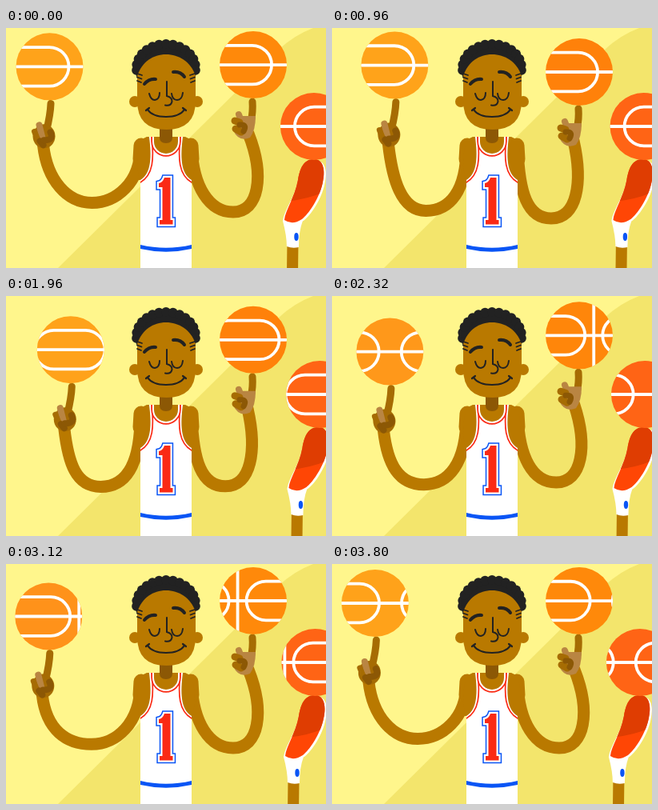
Write an HTML page with a canvas that moves like this. It is 400x300 px and loops after 3840 ms.

```html
<!DOCTYPE html>
<html>
<head>
<meta charset="utf-8">
<title>Spinning basketballs</title>
<style>
html, body { margin: 0; width: 100%; height: 100%; overflow: hidden; background: #fff68c; }
canvas { display: block; }
</style>
</head>
<body>
<canvas id="stage" width="400" height="300"></canvas>
<script>
const ctx = document.getElementById('stage').getContext('2d');
const LOOP = 3840, STEP = 40, R = 42, WRAP = 226;
const SKIN = '#b97900', FINGER = '#a66c03', DARK = '#8c5805', TAN = '#b98542', INK = '#222';
const RED = '#fa2a14', BLUE = '#0a55f5';
ctx.lineCap = 'round';

function fill(path, color) {
  ctx.fillStyle = color;
  ctx.fill(new Path2D(path));
}

function stroke(path, color, width) {
  ctx.strokeStyle = color;
  ctx.lineWidth = width;
  ctx.stroke(new Path2D(path));
}

function oval(x, y, rx, ry, color) {
  ctx.fillStyle = color;
  ctx.beginPath();
  ctx.ellipse(x, y, rx, ry, 0, 0, 7);
  ctx.fill();
}

function at(x, y, draw) {
  ctx.save();
  ctx.translate(x, y);
  draw();
  ctx.restore();
}

function mirrored(draw) {
  draw();
  at(400, 0, () => {
    ctx.scale(-1, 1);
    draw();
  });
}

// Cosine peaking at the given time, once per loop
const wave = (t, peak) => Math.cos((t - peak) / LOOP * 2 * Math.PI);
// The same wave with flattened ends
const eased = (t, peak, k) => Math.tanh(k * wave(t, peak)) / Math.tanh(k);

// The seams scroll sideways behind a round window; turn is in revolutions
function ball(x, y, turn, color) {
  at(x, y, () => {
    oval(0, 0, R, R, color);
    ctx.clip();
    stroke('M-42 0H42', '#fff', 3.8);
    const start = ((turn % 1) + 1) % 1 * WRAP;
    for (const left of [start - 2 * WRAP, start - WRAP, start]) {
      const middle = left + WRAP / 2;
      ctx.beginPath();
      ctx.roundRect(left + 14, -24.3, WRAP / 2 - 25, 48.6, 24.3);
      ctx.roundRect(middle + 11, -24.3, WRAP / 2 - 25, 48.6, 24.3);
      ctx.moveTo(middle, -R);
      ctx.lineTo(middle, R);
      ctx.stroke();
    }
  });
}

function background() {
  ctx.fillStyle = '#fff68c';
  ctx.fillRect(0, 0, 400, 300);
  fill('M65 300L341 27Q360 9 384 0H400V300Z', '#f3e56c');
}

function leftHand(x, y) {
  at(x, y, () => {
    oval(-7, 87, 14, 15, FINGER);
    stroke('M1.5 46Q1 60 -4 80', FINGER, 9);
    stroke('M-13 73L-9 89', TAN, 8);
    stroke('M-19 81L-14 93', FINGER, 7);
    stroke('M-12 93L-8 98', DARK, 8);
    stroke('M1 82Q6 92 -7 92', DARK, 8);
  });
}

function rightHand(x, y) {
  at(x, y, () => {
    stroke('M-1 46Q0 58 -3 72', FINGER, 9);
    fill('M-13 64H3Q3 82 -4 91Q-18 97 -25 82Z', TAN);
    stroke('M-18 62L-15 70', TAN, 8);
    stroke('M-23 70L-17 72', FINGER, 9);
    stroke('M-22 80L-15 84', FINGER, 9);
    stroke('M-17 75Q-7 74 -12 83', DARK, 7);
  });
}

function jersey() {
  fill('M176 136H224Q240 140 234 190H166Q160 140 176 136Z', SKIN);
  const shirt = 'M179 136C182 160 182 182 168 190V300H232V190C218 182 218 160 221 136Z';
  fill(shirt, '#fff');
  ctx.save();
  ctx.clip(new Path2D(shirt));
  mirrored(() => stroke('M182 134C185 162 185 185 166 194', RED, 1.7));
  const collar = 'M185 134V142A15 15 0 0 0 215 142V134';
  stroke(collar, RED, 7.4);
  stroke(collar, '#fff', 4);
  fill(collar, SKIN);
  stroke('M164 272.5Q200 282 236 272.5', BLUE, 4.8);
  ctx.restore();
  const digit = 'M198 187H205.5V240H208.5V245.5H192V240H195.5V199H191V194Q196 193 198 187Z';
  stroke(digit, BLUE, 7.4);
  stroke(digit, '#fff', 4.4);
  fill(digit, RED);
}

function head() {
  fill('M192 118H208V137Q208 144 200 144Q192 144 192 137Z', DARK);
  oval(200, 50, 39, 33, INK);
  for (let i = 0; i <= 14; i++) {
    const a = Math.PI * (0.97 + i * 1.06 / 14);
    oval(200 + 37 * Math.cos(a), 50 + 30 * Math.sin(a), 6, 6, INK);
  }
  mirrored(() => oval(161, 92, 7, 7, SKIN));
  fill('M164 60C170 42 184 33 200 33C216 33 231 42 237 60V91Q237 127 200.5 127Q164 127 164 91Z', SKIN);
  mirrored(() => stroke('M164 57L170 59M164 61.5L169.5 63.5M164 66L169 68', INK, 1.8));
  stroke('M173 70Q179 63 187 64M209 55Q218 54 223 61', INK, 4);
  stroke('M179 82Q181 90 186 90Q192 89 192 81M207 82Q208 90 214 90Q220 90 221 81', INK, 2);
  stroke('M201 67V85Q208 87 207.5 92Q206 98 199 96.5', INK, 2);
  stroke('M177 102Q183 111 200 111Q217 111 223 102M175 103L179 100M221 100L225 103', INK, 2.2);
}

function kicker(x, turn) {
  at(0.75 * (x - 385), 0, () => {
    stroke('M358.5 270L358 310', SKIN, 14);
    fill('M346 241C348 227 362 210 365 190L397 192C397 215 379 230 371 241Q366 254 366 274Q358 276 351 273Q351 260 346 241Z', '#fff');
    const sole = 'M385 164C398 164 399 180 396 193C392 213 378 233 370 239Q358 247 348 240C349 228 361 212 365 190C368 172 374 164 385 164Z';
    at(2.5, 1.5, () => fill(sole, '#fff'));
    fill(sole, '#ff4605');
    ctx.save();
    ctx.clip(new Path2D(sole));
    fill('M350 160H402V203Q380 214 350 217Z', '#df3d02');
    ctx.restore();
    oval(363, 261, 2.7, 5, BLUE);
  });
  ball(x, 123, turn, '#ff6415');
}

function arms(x, y, drop, y2) {
  const elbowX = 84.5 + 0.42 * x;
  const elbowY = 219 + 0.45 * (x - 55) + 0.43 * (y - 49);
  stroke(`M168 150C168 ${elbowY - 25} ${elbowX + 30} ${elbowY} ${elbowX} ${elbowY}
    C${elbowX - 31} ${elbowY} ${x - 3} ${y + 142} ${x - 8} ${y + 98}`, SKIN, 15);
  const bendX = 284 - 10 * drop, bendY = 230 + 8 * drop;
  stroke(`M232 150C234 ${bendY - 32} ${bendX - 30} ${bendY} ${bendX} ${bendY}
    C${bendX + 32} ${bendY} ${324 - 10 * drop} ${y2 + 139} ${303 - drop} ${y2 + 86}`, SKIN, 15);
  mirrored(() => stroke('M169 147L168 164', SKIN, 19));
}

function draw(t) {
  const spin = t / 480;
  const x = 68 + 17 * wave(t, 1520);
  const y = 57.5 + 12.3 * eased(t, 2485, 1.2);
  const drop = (1 + eased(t, 1320, 4)) / 2;
  const y2 = 46 + 9 * drop;
  const shade = Math.max(0, wave(t, 2880));

  background();
  kicker(388.6 - 3.8 * wave(t, LOOP - 150), -0.168 - spin);
  arms(x, y, drop, y2);
  jersey();
  head();
  leftHand(x, y);
  rightHand(309, y2);
  ball(x, y, 0.168 + spin, `hsl(${36 - 5 * shade} 100% 55%)`);
  ball(309, y2, 0.164 + spin / 2, `hsl(${31 - 2 * drop} 100% 52%)`);
}

function frame(now) {
  draw(Math.floor(now % LOOP / STEP) * STEP);
  requestAnimationFrame(frame);
}
requestAnimationFrame(frame);
</script>
</body>
</html>
```
